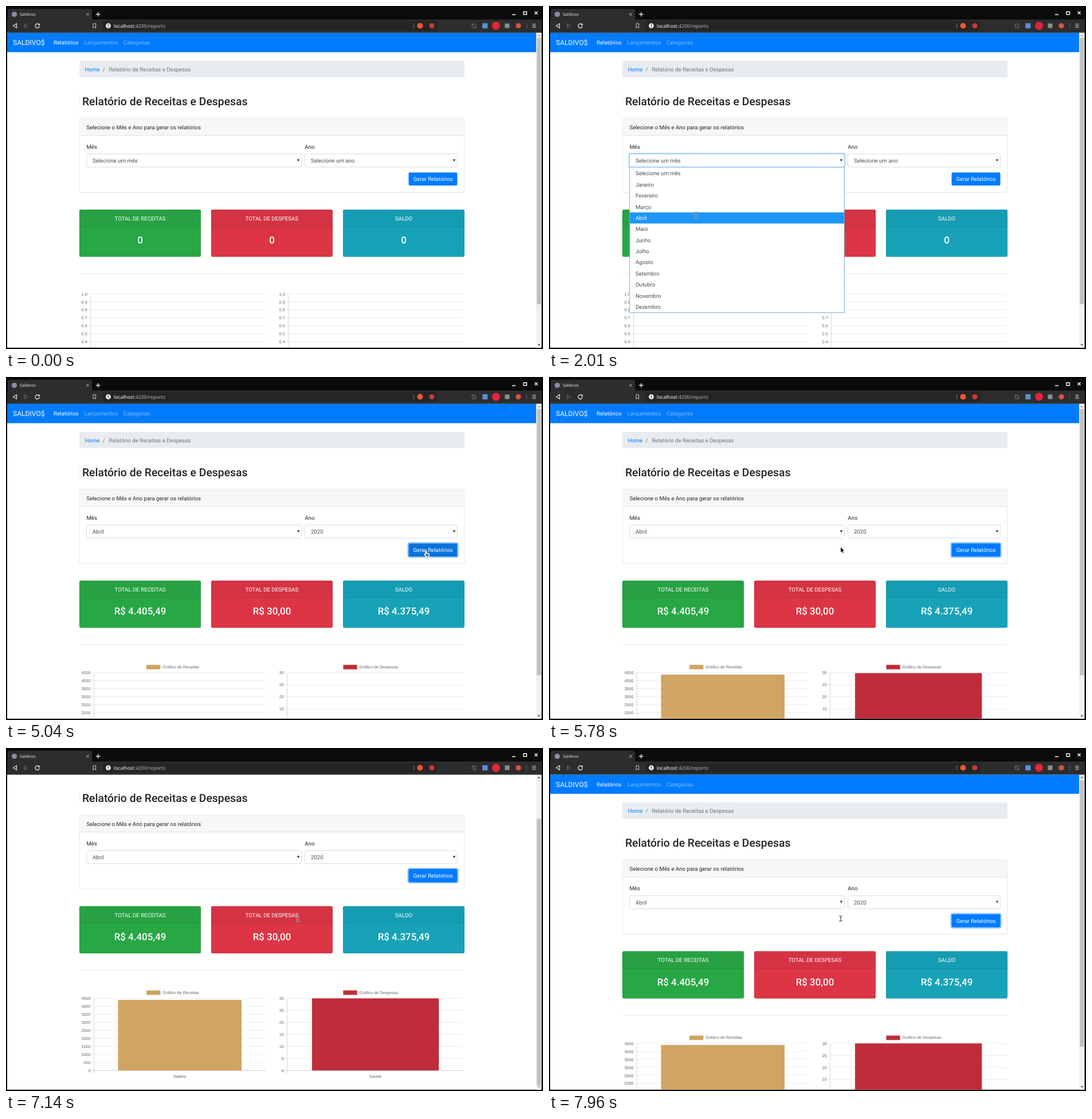
An HTML page with a canvas that plays this animation: 937 px wide and 598 px high, repeating every 8 s.

```html
<!DOCTYPE html>
<html lang="pt-BR">
<head>
<meta charset="utf-8">
<title>Saldivos</title>
<style>
html, body { margin: 0; width: 100%; height: 100%; overflow: hidden; background: #000; }
canvas { display: block; }
</style>
</head>
<body>
<canvas id="stage" width="937" height="598"></canvas>
<script>
const ctx = document.getElementById('stage').getContext('2d');
const LOOP = 8000;
const UI = '"Noto Sans", sans-serif', PAGE = 'Roboto, sans-serif', CHART = '"Liberation Sans", Arial, sans-serif';
const BODY = 9.69, SMALL = 7.26;
const MONTHS = ['Selecione um mês', 'Janeiro', 'Fevereiro', 'Março', 'Abril', 'Maio', 'Junho', 'Julho',
  'Agosto', 'Setembro', 'Outubro', 'Novembro', 'Dezembro'];
const YEARS = ['Selecione um ano', '2016', '2017', '2018', '2019', '2020'];
const ROW = 19.38, LIST_TOP = 282.3;

// Moments of the interaction, in ms
const T = { month: 500, monthList: 560, monthPick: 2060, year: 2600, yearList: 2700, yearPick: 3750,
  press: 4510, data: 5040 };

// Pointer stops: time, x, y
const POINTER = [[500, 262, 269], [650, 262, 269], [1300, 257, 364], [2060, 257, 364], [2600, 609, 269],
  [2840, 609, 269], [2970, 608, 346], [3520, 612, 386], [3790, 612, 386], [4340, 733, 304],
  [5160, 733, 304], [5780, 509, 297]];

const clamp = v => Math.max(0, Math.min(1, v));
const ramp = (t, start, length) => clamp((t - start) / length);
const smooth = u => u * u * (3 - 2 * u);
const easeOut = (u, power) => 1 - (1 - u) ** power;
const within = (t, a, b) => t >= a && t < b;

function rect(x, y, w, h, fill) {
  ctx.fillStyle = fill;
  ctx.fillRect(x, y, w, h);
}

function box(x, y, w, h, r, fill, stroke, width = 0.7) {
  ctx.beginPath();
  ctx.roundRect(x, y, w, h, r);
  if (fill) { ctx.fillStyle = fill; ctx.fill(); }
  if (stroke) { ctx.strokeStyle = stroke; ctx.lineWidth = width; ctx.stroke(); }
}

function dot(x, y, r, fill) {
  ctx.beginPath();
  ctx.arc(x, y, r, 0, 7);
  ctx.fillStyle = fill;
  ctx.fill();
}

function path(d, stroke, width = 1, fill) {
  const p = new Path2D(d);
  if (fill) { ctx.fillStyle = fill; ctx.fill(p); }
  if (stroke) { ctx.strokeStyle = stroke; ctx.lineWidth = width; ctx.stroke(p); }
}

// y is the middle of the capitals
function text(str, x, y, size, color, { font = PAGE, align = 'left', weight = 400 } = {}) {
  ctx.font = `${weight} ${size}px ${font}`;
  ctx.textAlign = align;
  ctx.fillStyle = color;
  ctx.fillText(str, x, y + size * 0.355);
}

function pointerAt(t) {
  let i = POINTER.findIndex(p => p[0] > t);
  if (i < 0) return POINTER.at(-1).slice(1);
  const [t0, x0, y0] = POINTER[i - 1], [t1, x1, y1] = POINTER[i];
  const u = smooth((t - t0) / (t1 - t0));
  return [x0 + (x1 - x0) * u, y0 + (y1 - y0) * u];
}

function scrollAt(t) {
  return 79.2 * (easeOut(ramp(t, 5840, 460), 2) - easeOut(ramp(t, 7365, 655), 2));
}

function drawBrowser() {
  rect(0, 0, 937, 598, '#000');
  rect(2, 1, 933, 23, '#0b0b0b');
  box(3, 5, 147, 22, [3, 3, 0, 0], '#2d2d2d');
  rect(2, 23.5, 933, 23, '#2d2d2d');
  rect(168, 26, 584, 17, '#252525');

  dot(14.5, 14.5, 4.6, '#868da6');
  text('Saldivos', 24, 14.5, SMALL, '#e4e4e4', { font: UI });
  path('M140.5 12.5l4 4m0-4l-4 4', '#ddd');
  path('M157 14.5h7.5M160.75 10.8v7.5', '#eee', 1.3);
  path('M883 15h6', '#fff', 1.5);
  path('M903 10h5.5v4.8h-5.5z', '#fff', 1.4);
  path('M922.5 9.6l5 5m0-5l-5 5', '#fff', 1.4);

  path('M18.5 30.8v7.4l-6-3.7z', '#eee', 1.1);
  path('M32 30.8v7.4l6-3.7z', '#777', 1);
  path('M57.5 32.2a3.7 3.7 0 1 0 .9 3', '#eee', 1.2);
  path('M58.9 30.3v3.4h-3.4z', null, 0, '#eee');
  path('M152 30.8h4.6v7.6l-2.3-2-2.3 2z', '#ddd', 0.9);
  dot(178.5, 34.5, 4.4, '#f2f2f2');
  rect(177.9, 31.8, 1.2, 3.4, '#252525');
  rect(177.9, 36, 1.2, 1.2, '#252525');
  text('localhost', 188, 34.5, 8.5, '#fff', { font: UI });
  const hostWidth = ctx.measureText('localhost').width;
  text(':4200/reports', 188 + hostWidth, 34.5, 8.5, '#b4b4b4', { font: UI });

  rect(711, 30, 0.8, 9, '#8a8a8a');
  dot(722.5, 34.5, 5, '#f2562c');
  dot(743, 34.5, 4.6, '#c93a3a');
  box(812.8, 31, 7.4, 7.4, 3.7, null, '#777', 1);
  path('M813 31l7 7.5', '#777', 0.9);
  rect(831.3, 30, 9, 9, '#5b8de0');
  dot(855, 34.5, 7, '#e3243c');
  rect(870.5, 30.5, 8, 8, '#8b8f8a');
  dot(894, 34.5, 4.6, '#d9553f');
  rect(908, 30, 0.8, 9, '#666');
  path('M918.3 31.7h6.4m-6.4 2.8h6.4m-6.4 2.8h6.4', '#ddd', 1);
}

function drawScrollbar(scroll) {
  rect(925, 46.5, 9.5, 549.5, '#f1f1f1');
  rect(926.3, 55.5 + scroll * 0.86, 7, 464.5, '#c1c1c1');
  path('M927.6 52.4h4.6l-2.3-2.6z', null, 0, scroll > 0.1 ? '#444' : '#999');
  path('M927.6 589.6h4.6l-2.3 2.6z', null, 0, scroll > 79 ? '#999' : '#444');
}

function drawRing(x, y, w, h, alpha) {
  if (alpha > 0) box(x - 1, y - 1, w + 2, h + 2, 3, null, `rgba(0,123,255,${alpha})`, 1.9);
}

function drawSelect(x, w, value, focus) {
  drawRing(x, 258, w, 22.8, 0.3 * focus);
  box(x, 258, w, 22.8, 2.4, '#fff', focus > 0.5 ? '#80bdff' : '#ced4da', 0.8);
  text(value, x + 10.3, 270, BODY, '#495057');
  path(`M${x + w - 7.6} 267.2h4.4l-2.2 4z`, null, 0, '#333');
}

function drawList(x, w, items, y) {
  const height = items.length * ROW;
  const active = Math.max(0, Math.min(items.length - 1, Math.floor((y - LIST_TOP) / ROW)));
  rect(x + 0.5, 282, w, height + 1, 'rgba(0,0,0,.18)');
  rect(x, 281, w, height + 1.6, '#fff');
  rect(x + 0.5, LIST_TOP + active * ROW, w - 1, ROW, '#1e96f7');
  items.forEach((item, i) =>
    text(item, x + 10.3, LIST_TOP + (i + 0.5) * ROW, BODY, i === active ? '#fff' : '#495057'));
  box(x + 0.2, 281, w - 0.4, height + 1.6, 0, null, '#5f9fdf', 0.8);
}

function drawTotal(x, color, title, value) {
  box(x, 355, 212, 82.3, 2.4, color, 'rgba(0,0,0,.1)', 0.6);
  box(x, 355, 212, 30.2, [2.4, 2.4, 0, 0], 'rgba(0,0,0,.035)');
  rect(x, 384.9, 212, 0.7, 'rgba(0,0,0,.13)');
  text(title, x + 106, 370.5, BODY, '#fff', { align: 'center' });
  text(value, x + 106, 408.3, 16.94, '#fff', { align: 'center', weight: 500 });
}

// Horizontal grid with labels counting down from the top value
function drawGrid(axisX, right, top, step, labels) {
  labels.forEach((label, i) => {
    const y = top + i * step;
    rect(axisX - 5, y - 0.35, right - axisX + 5, 0.7, label === '0' ? 'rgba(0,0,0,.28)' : 'rgba(0,0,0,.11)');
    text(label, axisX - 6, y, SMALL, '#666', { font: CHART, align: 'right' });
  });
  rect(axisX - 0.35, top, 0.7, step * (labels.length - 1) + 6, 'rgba(0,0,0,.22)');
}

function drawChart({ axisX, right, max, step, value, barX, barW, color, legendX, title, category }, grow) {
  const top = 515.7, height = 125.7, count = max / step;
  box(legendX, 501.8, 24.5, 8, 0, color, 'rgba(255,255,255,.4)', 0.6);
  text(title, legendX + 28.3, 505.5, SMALL, '#666', { font: CHART });
  drawGrid(axisX, right, top, height / count, Array.from({ length: count + 1 }, (_, i) => String(max - i * step)));
  const barH = height * value / max * grow;
  rect(barX, top + height - barH, barW, barH, color);
  text(category, barX + barW / 2, 652, SMALL, '#666', { font: CHART, align: 'center' });
}

const INCOME = { axisX: 153.6, right: 453, max: 4500, step: 500, value: 4405.49, barX: 195.5, barW: 215.5,
  color: '#d0a461', legendX: 245, title: 'Gráfico de Receitas', category: 'Salário' };
const EXPENSES = { axisX: 490.7, right: 798, max: 30, step: 5, value: 30, barX: 534, barW: 221.3,
  color: '#c02d3a', legendX: 588.3, title: 'Gráfico de Despesas', category: 'Saúde' };

function drawPage(t, px, py) {
  rect(2, 46.5, 923, 700, '#fff');
  rect(2, 46.6, 923, 33.9, '#007bff');
  text('SALDIVO$', 12, 64, 12.1, '#fff');
  text('Relatórios', 83, 64, BODY, '#fff');
  text('Lançamentos', 136.5, 64, BODY, 'rgba(255,255,255,.5)');
  text('Categorias', 204.8, 64, BODY, 'rgba(255,255,255,.5)');

  box(128, 95.4, 672, 28.9, 2.4, '#e9ecef');
  text('Home', 137.4, 110.2, BODY, '#007bff');
  text('/', 168.8, 110.2, BODY, '#6c757d');
  text('Relatório de Receitas e Despesas', 179.4, 110.2, BODY, '#6c757d');
  rect(128, 154, 0.6, 23, '#e6e6e6');
  text('Relatório de Receitas e Despesas', 133, 166, 19.37, '#212529', { weight: 500 });

  box(128.2, 196, 671.6, 129.5, 2.4, '#fff', 'rgba(0,0,0,.15)');
  rect(128.5, 196.3, 671, 29.3, '#f7f7f7');
  rect(128.2, 225.3, 671.6, 0.7, 'rgba(0,0,0,.14)');
  text('Selecione o Mês e Ano para gerar os relatórios', 140.4, 211.3, BODY, '#212529');
  text('Mês', 140.4, 245.5, BODY, '#212529');
  text('Ano', 521.3, 245.5, BODY, '#212529');

  drawSelect(140.6, 374.8, MONTHS[t < T.monthPick ? 0 : 4], ramp(t, T.month, 150) - ramp(t, T.year, 150));
  drawSelect(521.6, 265.8, YEARS[t < T.yearPick ? 0 : 5], ramp(t, T.year, 150) - ramp(t, T.press, 150));

  drawRing(702.5, 290.3, 85, 22.8, 0.5 * ramp(t, T.press, 150));
  const hover = overButton(t, px, py);
  const pressed = within(t, T.press, T.press + 120);
  box(702.5, 290.3, 85, 22.8, 2.4, pressed ? '#0062cc' : hover ? '#0a72dc' : '#007bff');
  text('Gerar Relatórios', 745, 302, BODY, '#fff', { align: 'center' });

  const loaded = t >= T.data;
  drawTotal(128, '#28a745', 'TOTAL DE RECEITAS', loaded ? 'R$ 4.405,49' : '0');
  drawTotal(358, '#dc3545', 'TOTAL DE DESPESAS', loaded ? 'R$ 30,00' : '0');
  drawTotal(588, '#17a2b8', 'SALDO', loaded ? 'R$ 4.375,49' : '0');
  rect(128, 466.2, 672, 0.7, 'rgba(0,0,0,.12)');

  if (loaded) {
    const grow = easeOut(ramp(t, T.data, 1000), 4);
    drawChart(INCOME, grow);
    drawChart(EXPENSES, grow);
  } else {
    const labels = Array.from({ length: 11 }, (_, i) => (1 - i / 10).toFixed(1));
    drawGrid(147.7, 453, 502.2, 13.85, labels);
    drawGrid(492.7, 798, 502.2, 13.85, labels);
  }

  if (within(t, T.monthList, T.monthPick)) drawList(140.6, 374.8, MONTHS, py);
  if (within(t, T.yearList, T.yearPick)) drawList(521.6, 265.8, YEARS, py);
}

const overButton = (t, x, y) => t > T.yearPick && x > 702 && x < 788 && y > 290 && y < 314;

function drawPointer(t, x, y) {
  if (t < POINTER[0][0]) return;
  ctx.save();
  ctx.translate(x, y);
  ctx.lineJoin = 'round';
  if (overButton(t, x, y)) {
    path('M-1 0q1-1 1.8 0v3.4l4 .8q1 .4.8 1.6l-.8 3.4h-4.6l-3-3.4q0-1.2 1.8-.4z', '#fff', 1.5, '#444');
    path('M1.6 5v2.4m1.6-2.2v2.2', '#ccc', 0.5);
  } else if (within(t, 2010, 2100) || t >= 7140) {
    const beam = 'M-2.5-4h2l.5.5.5-.5h2M0-3.5v7.5M-2.5 4.5h2l.5-.5.5.5h2';
    path(beam, 'rgba(255,255,255,.9)', 2.4);
    path(beam, '#111', 1);
  } else {
    path('M0 0v8.4l1.9-1.8 1.4 3.1 1.5-.7-1.4-2.9h2.6z', '#fff', 1.3, '#000');
    path('M0 0v8.4l1.9-1.8 1.4 3.1 1.5-.7-1.4-2.9h2.6z', null, 0, '#000');
  }
  ctx.restore();
}

function draw(t) {
  const [px, py] = t < POINTER[0][0] ? [-50, -50] : pointerAt(t);
  const scroll = scrollAt(t);
  ctx.textRendering = 'geometricPrecision';
  drawBrowser();
  ctx.save();
  ctx.beginPath();
  ctx.rect(2, 46.5, 923, 549.3);
  ctx.clip();
  ctx.translate(0, -scroll);
  drawPage(t, px, py);
  ctx.restore();
  drawScrollbar(scroll);
  drawPointer(t, px, py);
}

function loop() {
  draw(performance.now() % LOOP);
  requestAnimationFrame(loop);
}
loop();
</script>
</body>
</html>
```
